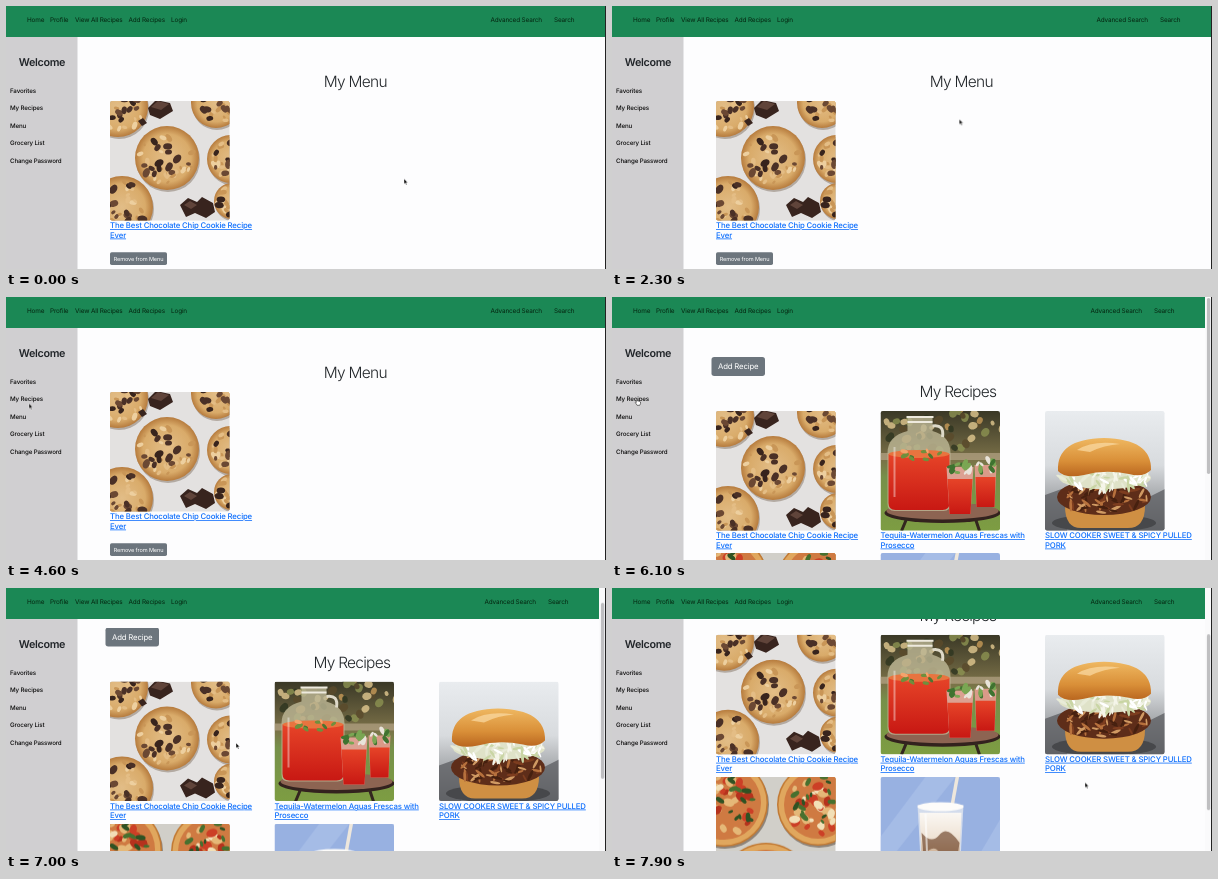
An HTML page for the animation above (8000 ms loop, 600 px wide and 263 px high).

```html
<!DOCTYPE html>
<html lang="en">
<head>
<meta charset="utf-8">
<title>Recipe pages</title>
<style>
html, body { margin: 0; width: 100%; height: 100%; overflow: hidden; background: #fdfdfe; }
svg { display: block; width: 600px; height: 263px; }
text { font-family: Inter, "Open Sans", sans-serif; text-rendering: geometricPrecision; letter-spacing: -.022em; }
.nav text { font-size: 6.4px; fill: #04240f; }
.side text { font-size: 6.2px; font-weight: 500; fill: #080808; }
.side .hello { font-size: 10.8px; font-weight: 600; letter-spacing: -.03em; fill: #212529; text-anchor: middle; }
.title { font-size: 15.5px; font-weight: 350; letter-spacing: -.048em; fill: #212529; text-anchor: middle; }
.link { font-size: 7.8px; font-weight: 500; letter-spacing: -.02em; fill: #0d6efd; text-decoration: underline; }
.button rect { fill: #6c757d; }
.button text { fill: #fff; text-anchor: middle; }

.menu, .recipes, .arrow, .hand, .scroll, .thumb, .cursor { animation: 8s -5ms infinite; }
.menu { animation-name: menu; }
.recipes { animation-name: recipes; }
.arrow { animation-name: arrow; }
.hand { animation-name: hand; }
.scroll { animation-name: scroll; }
.thumb { animation-name: thumb; }
.cursor { animation-name: cursor; }
.menu, .recipes, .arrow, .hand { animation-timing-function: step-end; }

@keyframes menu { 0% { visibility: visible } 66.25%, 100% { visibility: hidden } }
@keyframes recipes { 0% { visibility: hidden } 66.25%, 100% { visibility: visible } }
@keyframes arrow { 0% { opacity: 1 } 62.5% { opacity: 0 } 80%, 100% { opacity: 1 } }
@keyframes hand { 0% { opacity: 0 } 62.5% { opacity: 1 } 80%, 100% { opacity: 0 } }
@keyframes scroll {
  0%, 85% { transform: translateY(0); animation-timing-function: steps(2) }
  87.5% { transform: translateY(-20.5px); animation-timing-function: steps(5) }
  93.75% { transform: translateY(-42px); animation-timing-function: steps(4) }
  98.75%, 100% { transform: translateY(-67.3px) }
}
@keyframes thumb {
  0%, 85% { transform: translateY(0); animation-timing-function: steps(2) }
  87.5% { transform: translateY(13.8px); animation-timing-function: steps(5) }
  93.75% { transform: translateY(28.3px); animation-timing-function: steps(4) }
  98.75%, 100% { transform: translateY(45.2px) }
}
@keyframes cursor {
  0%, 22.5% { transform: translate(398px, 172.8px); animation-timing-function: steps(5) }
  28.75% { transform: translate(347.3px, 113.3px); animation-timing-function: steps(4) }
  33.75% { transform: translate(80px, 112px); animation-timing-function: steps(9) }
  45% { transform: translate(35px, 110px); animation-timing-function: steps(5) }
  51.25%, 60% { transform: translate(23px, 106.5px); animation-timing-function: steps(3) }
  63.75%, 72.5% { transform: translate(23px, 103.5px); animation-timing-function: steps(3) }
  76.25%, 77.5% { transform: translate(23px, 101px); animation-timing-function: steps(7) }
  86.25%, 93.75% { transform: translate(230px, 155px); animation-timing-function: steps(4) }
  98.75%, 100% { transform: translate(473px, 194.5px) }
}
</style>
</head>
<body>
<svg viewBox="0 0 600 263">
  <defs>
    <clipPath id="frame"><rect width="119.5" height="119.5" rx="2.2"/></clipPath>
    <linearGradient id="bun" x1="0" y1="0" x2="0" y2="1">
      <stop offset="0" stop-color="#efb861"/><stop offset=".6" stop-color="#d98f38"/><stop offset="1" stop-color="#b9661f"/>
    </linearGradient>
    <linearGradient id="slate" x1="0" y1="0" x2="0" y2="1">
      <stop offset="0" stop-color="#e9ecef"/><stop offset=".45" stop-color="#d8dbde"/><stop offset="1" stop-color="#717376"/>
    </linearGradient>
    <linearGradient id="garden" x1="0" y1="0" x2="0" y2="1">
      <stop offset="0" stop-color="#3a3826"/><stop offset=".4" stop-color="#7a7048"/>
      <stop offset=".55" stop-color="#76904a"/><stop offset="1" stop-color="#7d9d42"/>
    </linearGradient>
    <linearGradient id="juice" x1="0" y1="0" x2="0" y2="1">
      <stop offset="0" stop-color="#e64428"/><stop offset="1" stop-color="#c81813"/>
    </linearGradient>
    <linearGradient id="latte" x1="0" y1="0" x2="0" y2="1">
      <stop offset="0" stop-color="#fbf8f4"/><stop offset=".3" stop-color="#efe3d5"/>
      <stop offset=".6" stop-color="#b58a66"/><stop offset="1" stop-color="#e6d8c8"/>
    </linearGradient>
    <radialGradient id="dough">
      <stop offset="0" stop-color="#e2bd87"/><stop offset=".75" stop-color="#d9ab6a"/><stop offset="1" stop-color="#b67b3d"/>
    </radialGradient>

    <g id="cookies" clip-path="url(#frame)">
      <rect width="120" height="120" fill="#e3e1e0"/>
      <g id="batch"></g>
      <g fill="#38241e">
        <path d="M38 7l8-8 14 3 3 8-13 8-10-4z"/>
        <path d="M70 104l8-7 9 4 5-5 11 6 2 9-9 6-11-5-9 4z"/>
        <path d="M28 20l5-3 4 5-5 3z"/>
      </g>
      <path d="M41 6l7-6 11 3-8 6zM74 104l6-4 7 4-6 4z" fill="#60443a"/>
    </g>

    <g id="drinks" clip-path="url(#frame)">
      <rect width="120" height="120" fill="url(#garden)"/>
      <g id="bokeh" opacity=".8"></g>
      <path d="M0 42h120v7H0z" fill="#b5a487" opacity=".7"/>
      <ellipse cx="62" cy="102" rx="58" ry="10" fill="#33221e"/>
      <ellipse cx="62" cy="100" rx="56" ry="8.5" fill="#8d6452"/>
      <path d="M26 108l-5 12M95 108l4 12" stroke="#33261f" stroke-width="3"/>
      <path d="M27 6h25v14q18 5 18 22v51q0 7-7 7H14q-7 0-7-7V42q0-17 20-22z" fill="#bfb897" opacity=".8"/>
      <path d="M8 43h61v49q0 7-7 7H15q-7 0-7-7z" fill="url(#juice)"/>
      <ellipse cx="38.500" cy="43" rx="30.500" ry="4" fill="#e8743f"/>
      <path d="M26 6h27M27 11h25" stroke="#eeeade" stroke-width="2"/>
      <path d="M14 36v50" stroke="#fff" stroke-width="2" opacity=".4"/>
      <path d="M52 15q12-2 10 11" fill="none" stroke="#ded9c8" stroke-width="3"/>
      <g id="jugMint"></g>
      <path d="M66 56h27l-3 47H69z" fill="#dca192"/>
      <path d="M67 68h25l-2 35H69z" fill="url(#juice)"/>
      <path d="M94 54h22l-2 42H96z" fill="#d99a88"/>
      <path d="M95 66h20l-1 30H96z" fill="url(#juice)"/>
      <g id="mint"></g>
    </g>

    <g id="burger" clip-path="url(#frame)">
      <rect width="120" height="120" fill="url(#slate)"/>
      <path d="M0 84l22-8v44H0zM92 92l28-14v42H84z" fill="#5b5d61" opacity=".75"/>
      <ellipse cx="59" cy="112" rx="52" ry="9" fill="#47484b"/>
      <path d="M20 95h80q0 22-17 22H36q-16 0-16-22z" fill="#cf8f43"/>
      <ellipse cx="59" cy="86" rx="47" ry="18" fill="#5e2d19"/>
      <g id="pork"></g>
      <ellipse cx="60" cy="67" rx="46" ry="11" fill="#dfe2c8"/>
      <g id="slaw"></g>
      <path d="M13 60q-2-32 46-33 48 1 47 32-8 8-22 4-24-5-45 1-19 4-26-4z" fill="url(#bun)"/>
      <path d="M32 39q16-10 43-6-16 1-30 8z" fill="#fbdca6" opacity=".7"/>
    </g>

    <g id="pizza" clip-path="url(#frame)">
      <rect width="120" height="120" fill="#d1cfc9"/>
      <g id="pies"></g>
    </g>

    <g id="coffee" clip-path="url(#frame)">
      <rect width="120" height="120" fill="#98b1e1"/>
      <path d="M0 60l45-60h30L0 95zM120 42l-46 78h30l16-25z" fill="#acc2ea" opacity=".65"/>
      <path d="M71 32l6-33" stroke="#eee7dc" stroke-width="3.500"/>
      <path d="M37 28h46l-5 92H42z" fill="#d3dcec"/>
      <path d="M39 36h42l-4 84H43z" fill="url(#latte)"/>
      <ellipse cx="60" cy="30" rx="23" ry="4.500" fill="#fdfcfa"/>
      <path d="M41 56q10 12 18 2t20 8l-2 13q-12 7-18-3t-16 3z" fill="#7d563c" opacity=".75"/>
      <path d="M45 37l3 78" stroke="#fff" stroke-width="2" opacity=".6"/>
    </g>
  </defs>

  <rect width="600" height="263" fill="#fdfdfe"/>

  <g class="menu">
    <text class="title" x="349.300" y="81.200">My Menu</text>
    <use href="#cookies" x="104" y="95"/>
    <text class="link" x="104" y="222">The Best Chocolate Chip Cookie Recipe<tspan x="104" dy="9.500">Ever</tspan></text>
    <g class="button">
      <rect x="104" y="246.300" width="57" height="12.700" rx="1.700"/>
      <text x="132.500" y="254.700" font-size="5.600">Remove from Menu</text>
    </g>
  </g>

  <g class="recipes"><g class="scroll">
    <g class="button">
      <rect x="99.500" y="60" width="53.500" height="19" rx="2.700"/>
      <text x="126.200" y="72.400" font-size="7.800">Add Recipe</text>
    </g>
    <text class="title" x="345.800" y="100.300">My Recipes</text>
    <use href="#cookies" x="104" y="114"/>
    <use href="#drinks" x="268.500" y="114"/>
    <use href="#burger" x="433" y="114"/>
    <text class="link" x="104" y="241">The Best Chocolate Chip Cookie Recipe<tspan x="104" dy="9.500">Ever</tspan></text>
    <text class="link" x="268.500" y="241">Tequila-Watermelon Aguas Frescas with<tspan x="268.500" dy="9.500">Prosecco</tspan></text>
    <text class="link" x="433" y="241">SLOW COOKER SWEET &amp; SPICY PULLED<tspan x="433" dy="9.500">PORK</tspan></text>
    <use href="#pizza" x="104" y="256"/>
    <use href="#coffee" x="268.500" y="256"/>
  </g></g>

  <g class="side">
    <rect y="30" width="71.500" height="233" fill="#d0cfd1"/>
    <text class="hello" x="36" y="60">Welcome</text>
    <text x="4" y="86.600">Favorites</text>
    <text x="4" y="104.200">My Recipes</text>
    <text x="4" y="121.800">Menu</text>
    <text x="4" y="139.300">Grocery List</text>
    <text x="4" y="156.900">Change Password</text>
  </g>

  <g class="nav">
    <rect width="600" height="31" fill="#1b8855"/>
    <text x="21" y="16">Home</text>
    <text x="44" y="16">Profile</text>
    <text x="69" y="16">View All Recipes</text>
    <text x="122.500" y="16">Add Recipes</text>
    <text x="165" y="16">Login</text>
    <g class="menu">
      <text x="484.500" y="16">Advanced Search</text>
      <text x="548" y="16">Search</text>
    </g>
    <g class="recipes">
      <text x="478.500" y="16">Advanced Search</text>
      <text x="542" y="16">Search</text>
    </g>
  </g>

  <g class="recipes">
    <rect x="593" width="7" height="263" fill="#fafafb"/>
    <rect class="thumb" x="594.900" y="1" width="3.400" height="176" rx="1.700" fill="#bfbfc1"/>
  </g>
  <rect x="599" width="1" height="263" fill="#222"/>

  <g class="cursor">
    <path class="arrow" d="M0 0v5.200l1.200-1.100.9 2 .9-.4-.9-1.900h1.700z" fill="#111" stroke="#fff" stroke-width=".4"/>
    <path class="hand" d="M1.300.6q.8-.5 1.100.3v2q2.700 0 3.100 1.100v1.700l-.8 1.600H2.100L.2 4.400q.3-.7 1.100 0z" fill="#fff" stroke="#111" stroke-width=".55"/>
  </g>
</svg>
<script>
let seed = 17;
const rnd = () => (seed = seed * 16807 % 2147483647) / 2147483647;
const pick = list => list[Math.floor(rnd() * list.length)];
const add = (id, html) => document.getElementById(id).insertAdjacentHTML("beforeend", html);
const disc = (id, x, y, r, fill) => add(id, `<circle cx="${x}" cy="${y}" r="${r}" fill="${fill}"/>`);

// Random flecks inside an ellipse; flat sets how slim they are.
function scatter(id, n, cx, cy, rx, ry, size, flat, colors) {
  for (let i = 0; i < n; i++) {
    const a = rnd() * 2 * Math.PI, d = Math.sqrt(rnd()), s = size * (.6 + rnd() * .7);
    const x = cx + rx * d * Math.cos(a), y = cy + ry * d * Math.sin(a);
    add(id, `<ellipse rx="${s}" ry="${s * flat}" fill="${pick(colors)}"
      transform="translate(${x} ${y}) rotate(${rnd() * 180})"/>`);
  }
}

function cookie(x, y, r) {
  disc("batch", x + 1, y + 2, r, "#b3aaa2");
  disc("batch", x, y, r, "url(#dough)");
  scatter("batch", 26, x, y, r * .85, r * .85, 3.4, .6, ["#edcf9f", "#c99657", "#e4bd85"]);
  scatter("batch", 14, x, y, r * .8, r * .8, 3.9, .7, ["#38241d", "#4a3026", "#6b4833"]);
}

function pie(x, y, r) {
  disc("pies", x + 1, y + 2, r, "#8d8379");
  disc("pies", x, y, r, "#c27a34");
  disc("pies", x, y, r - 1.5, "#e0a75e");
  disc("pies", x, y, r - 7, "#cf7a42");
  scatter("pies", 36, x, y, r * .72, r * .72, 4.6, .7, ["#cc3f26", "#b5321d", "#f2dfb6", "#e5b878"]);
  scatter("pies", 18, x, y, r * .7, r * .7, 4, .5, ["#47702f", "#2f5223"]);
}

cookie(8, 6, 30);
cookie(106, 2, 25);
cookie(12, 106, 31);
cookie(121, 58, 24);
cookie(122, 100, 18);
cookie(57, 57, 32);

scatter("bokeh", 46, 60, 18, 62, 24, 4, .8, ["#c79a58", "#2d3520", "#8c9352", "#5b4a2b", "#e2c990"]);
scatter("jugMint", 9, 38, 45, 25, 6, 3.5, .5, ["#6f8f3d", "#f4a36c", "#4c7530"]);
scatter("mint", 10, 79, 57, 11, 7, 4, .5, ["#3f7330", "#7aa653", "#e9e4da"]);
scatter("mint", 9, 105, 55, 9, 7, 3.6, .5, ["#3f7330", "#7aa653", "#e9e4da"]);

scatter("pork", 65, 59, 87, 45, 16, 5, .25, ["#7d3d1f", "#b7713d", "#46200f", "#d09a63"]);
scatter("slaw", 60, 60, 68, 46, 11, 5, .25, ["#f5f5e9", "#c9d5a4", "#e8ebd7", "#fff"]);

pie(8, 26, 44);
pie(102, 28, 41);
pie(50, 112, 46);
</script>
</body>
</html>
```
